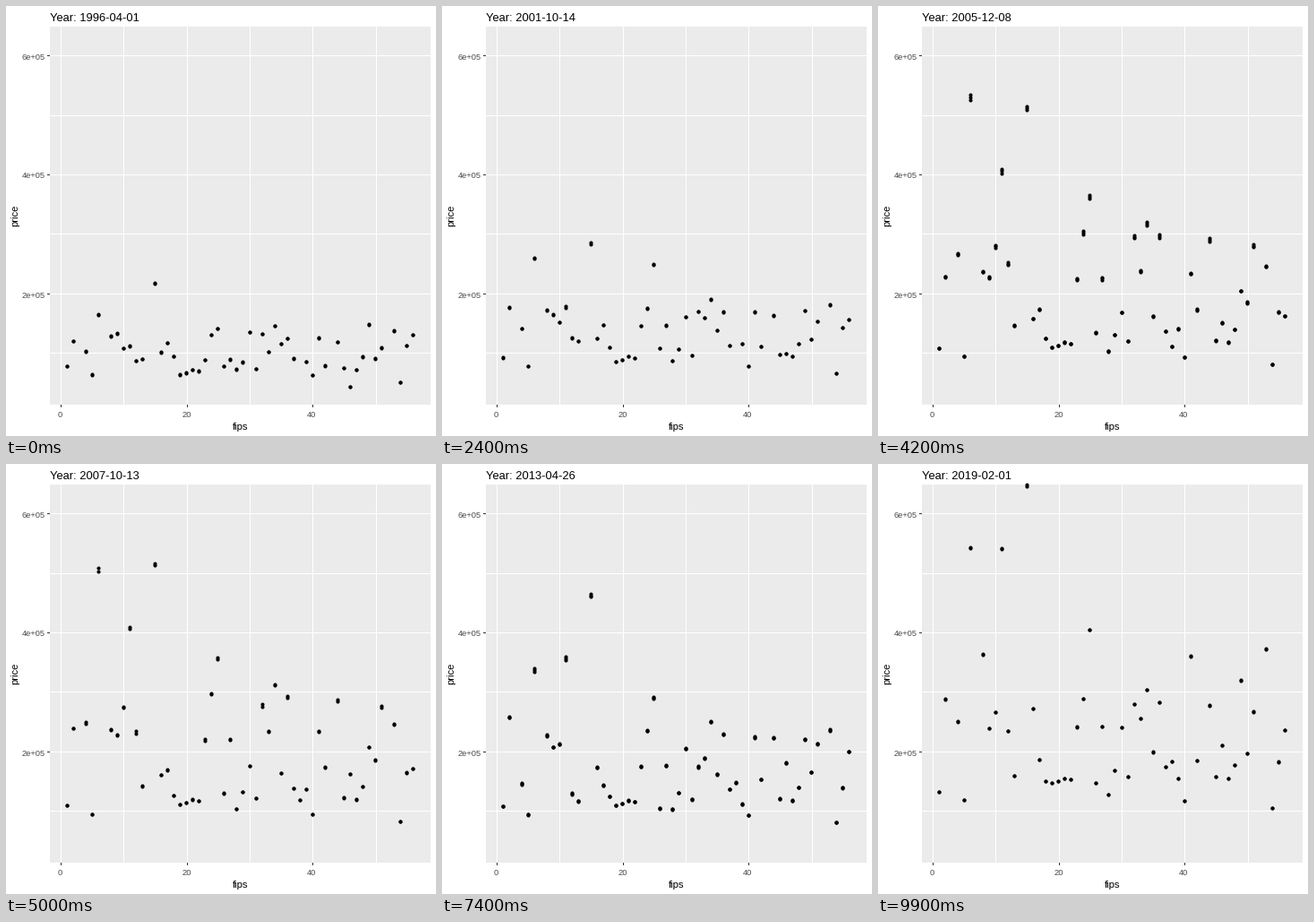
A matplotlib script that plays this animation: 480x480 px, repeating every 10000 ms.

```python
import numpy as np
import matplotlib.pyplot as plt
from matplotlib.animation import FuncAnimation
from matplotlib.patches import Rectangle

plt.rcParams["font.family"] = "Liberation Sans"

SIZE, DPI, FRAMES = 480, 100, 100
PX = 72 / DPI                      # one pixel in points
LEFT, RIGHT, TOP, BOTTOM = 49, 474, 23, 445

# Each region: total rise in $1000, strength of its early gain, boom and slump,
# and the first price in $1000 of each state code
REGIONS = [
    (56, .02, .15, .22, {1: 77, 5: 63, 18: 94, 28: 72, 40: 62, 54: 50}),
    (85, .02, .15, .22, {19: 63, 20: 66, 21: 71, 22: 69, 29: 84, 31: 73,
                         35: 115, 37: 90, 45: 74, 47: 71, 48: 93}),
    (72, .19, .42, .40, {13: 89, 17: 116, 26: 77, 39: 84, 55: 112}),
    (153, -.01, .74, .50, {4: 102, 12: 86, 32: 131}),
    (387, -.01, .59, .32, {6: 163}),
    (435, -.11, .29, .20, {11: 112, 15: 218}),
    (160, .02, .71, .10, {10: 107, 24: 130, 34: 145, 36: 124, 44: 118, 51: 108}),
    (107, .05, .50, .05, {9: 132, 42: 78, 50: 90}),
    (156, .13, .50, .20, {23: 87, 27: 88, 33: 101}),
    (269, .17, .45, .20, {25: 139}),
    (240, -.07, .06, .36, {8: 128, 41: 125, 53: 137}),
    (175, -.12, -.08, .36, {16: 101, 49: 148}),
    (168, .10, .23, -.08, {2: 119, 46: 42}),
    (106, 0, -.12, .10, {30: 135, 38: 78, 56: 130}),
]

months = np.arange("1996-04", "2019-03", dtype="datetime64[M]").astype("datetime64[D]")
start = months[0]
days = (months - start).astype(int)
span = int(days[-1])
years = 1996.25 + days / 365.25
# Monthly records; each one is shown only in its nearest frame
shown_in = np.rint((FRAMES - 1) * days / span).astype(int)


def bump(center, width):
    return np.exp(-((years - center) / width) ** 2)


def progress(early, boom, slump):
    """Share of the total rise reached in each month."""
    return (days / span + early * bump(2001, 2.5)
            + boom * bump(2006.6, 2.5) - slump * bump(2012.3, 4))


def sx(fips):
    return 61.2 + 7.027 * fips


def sy(price):
    return 453.9 - .6637 * price


xs, ys = [], []
for rise, *shape, states in REGIONS:
    gain = rise * progress(*shape)
    for fips, price in states.items():
        y = sy(price + gain)
        if fips == 38:             # records begin late here
            y[years < 2005] = np.nan
        xs.append(sx(fips) - .5)
        ys.append(y - .5)
xs, ys = np.array(xs), np.array(ys).T

fig = plt.figure(figsize=(SIZE / DPI, SIZE / DPI), dpi=DPI, facecolor="white")
ax = fig.add_axes([0, 0, 1, 1])
ax.set(xlim=(0, SIZE), ylim=(SIZE, 0))
ax.axis("off")


def label(x, y, text, px, color="black", **kw):
    return ax.text(x, y, text, fontsize=px * PX, color=color, **kw)


def line(x, y, color="white"):
    ax.plot(x, y, color=color, lw=PX, solid_capstyle="butt", snap=False, zorder=1)


ax.add_patch(Rectangle((LEFT, TOP), RIGHT - LEFT, BOTTOM - TOP, fc="#EBEBEB", lw=0, zorder=0))
for price in range(100, 700, 100):
    y = int(sy(price)) + .5
    line([LEFT, RIGHT], [y, y])
    if price % 200 == 0:
        line([46, LEFT], [y, y], "#333333")
        label(44, y + 4, f"{price // 100}e+05", 9.4, "#4D4D4D", ha="right")
for fips in range(0, 60, 10):
    x = round(sx(fips)) + .5
    line([x, x], [TOP, BOTTOM])
    if fips % 20 == 0:
        line([x, x], [BOTTOM, BOTTOM + 3], "#333333")
        label(x - 1, 459, str(fips), 9.4, "#4D4D4D", ha="center")

label(261.5, 473, "fips", 11.2, ha="center")
label(15.7, 234, "price", 11.2, rotation=90, ha="right", va="center")
title = label(LEFT, 17, "", 12.9)
dots, = ax.plot([], [], "o", color="black", ms=4.1 * PX, mew=0, zorder=3)


def update(i):
    rows = ys[shown_in == i]
    dots.set_data(np.tile(xs, len(rows)), rows.ravel())
    title.set_text(f"Year: {start + i * span // (FRAMES - 1)}")
    return dots, title


anim = FuncAnimation(fig, update, frames=FRAMES, interval=100, repeat=True, repeat_delay=0)
plt.show()
```
